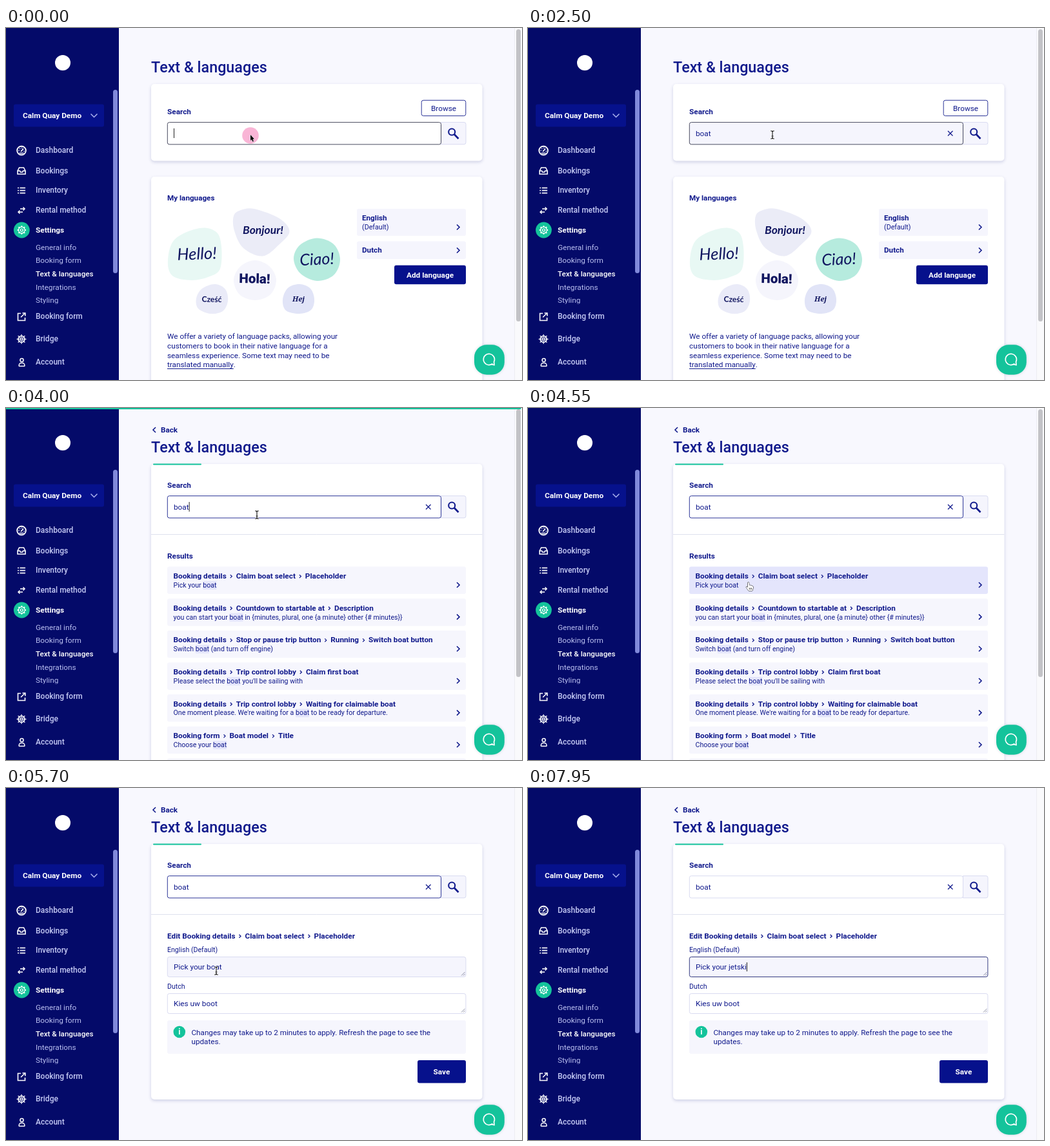
Animation of 800x547 px, one loop 8000 ms. Source, as an HTML page with a canvas:

```html
<!DOCTYPE html>
<html lang="en">
<head>
<meta charset="utf-8">
<title>Text &amp; languages</title>
<style>
html, body { margin: 0; width: 100%; height: 100%; overflow: hidden; background: #f8f8fe; }
canvas { display: block; width: 800px; height: 547px; }
</style>
</head>
<body>
<canvas id="stage"></canvas>
<script>
const W = 800, H = 547, LOOP = 8000;
const cv = document.getElementById('stage');
const dpr = window.devicePixelRatio || 1;
cv.width = W * dpr;
cv.height = H * dpr;
const c = cv.getContext('2d');

const NAVY = '#111a8c', DEEP = '#040a69', BTN = '#06118c', TEAL = '#14c39b';
const PALE = '#f5f5fd', LINE = '#d9dbf1', INK = '#10155f';
const SANS = 'Roboto, "Open Sans", sans-serif';

// Moments of the story, in ms
const SUBMIT = 2450, RESULTS = 3960, HOVER = 4500, OPEN = 4640, DETAIL = 5170, FOCUS = 6200, SELECT = 6380;
const SEARCH_KEYS = [450, 650, 850, 1050];
const EDIT_KEYS = [6850, 7100, 7400, 7600, 7750, 7900];

function text(s, x, y, size, color = NAVY, weight = 400, align = 'left', family = SANS) {
  c.font = `${weight} ${size}px ${family}`;
  c.fillStyle = color;
  c.textAlign = align;
  c.fillText(s, x, y + size * 0.32);
  return c.measureText(s).width;
}
function width(s, size, weight = 400) {
  c.font = `${weight} ${size}px ${SANS}`;
  return c.measureText(s).width;
}
function box(x, y, w, h, r, fill, stroke) {
  c.beginPath();
  c.roundRect(x, y, w, h, r);
  if (fill) { c.fillStyle = fill; c.fill(); }
  if (stroke) { c.strokeStyle = stroke; c.lineWidth = 1; c.stroke(); }
}
function disc(x, y, r, fill) {
  c.beginPath();
  c.arc(x, y, r, 0, 7);
  c.fillStyle = fill;
  c.fill();
}
function ring(x, y, r, color, lw) {
  c.beginPath();
  c.arc(x, y, r, 0, 7);
  c.strokeStyle = color;
  c.lineWidth = lw;
  c.stroke();
}
function line(pts, color, lw = 1.5) {
  c.beginPath();
  for (let i = 0; i < pts.length; i += 2) c.lineTo(pts[i], pts[i + 1]);
  c.strokeStyle = color;
  c.lineWidth = lw;
  c.stroke();
}
function card(y, h) {
  c.save();
  c.shadowColor = 'rgba(40,50,130,.2)';
  c.shadowBlur = 5 * dpr;
  c.shadowOffsetY = 2 * dpr;
  box(225, y, 513.5, h, 5, '#fff');
  c.restore();
}
// Smooth closed curve through the points
function blob(pts, fill) {
  const n = pts.length / 2;
  const at = (i, k) => pts[((i + n) % n) * 2 + k];
  const pull = (i, k, s) => at(i, k) + s * (at(i + 1, k) - at(i - 1, k)) / 6;
  c.beginPath();
  c.moveTo(pts[0], pts[1]);
  for (let i = 0; i < n; i++) {
    c.bezierCurveTo(pull(i, 0, 1), pull(i, 1, 1), pull(i + 1, 0, -1), pull(i + 1, 1, -1), at(i + 1, 0), at(i + 1, 1));
  }
  c.fillStyle = fill;
  c.fill();
}
function word(s, x, y, size, angle, style, family) {
  c.save();
  c.translate(x, y);
  c.rotate(angle);
  text(s, 0, 0, size, INK, style, 'center', family);
  c.restore();
}
const chevron = (x, y) => line([x - 2, y - 4, x + 2, y, x - 2, y + 4], NAVY, 1.6);
const blink = (t, from) => (t - from) % 1000 < 500;
const typed = (keys, t) => keys.filter(k => t >= k).length;

function gear(x, y) {
  ring(x, y, 4.9, '#fff', 1.2);
  ring(x, y, 2, '#fff', 1.2);
  for (let i = 0; i < 8; i++) {
    const a = i * Math.PI / 4, u = Math.cos(a), v = Math.sin(a);
    line([x + u * 5, y + v * 5, x + u * 6.7, y + v * 6.7], '#fff', 2);
  }
}

const icons = {
  dashboard(y) {
    ring(24, y, 6.8, '#fff', 1.9);
    line([23, y + 1.5, 27, y - 3], '#fff', 1.8);
    for (const [dx, dy] of [[-4, 0], [-2.5, -3], [0.5, -4], [4, 1]]) disc(24 + dx, y + dy, 0.8, '#fff');
    line([20.5, y + 4, 27.5, y + 4], '#fff', 1.5);
  },
  tray(y) {
    line([18, y, 20.5, y - 5, 27.5, y - 5, 30, y, 30, y + 5, 18, y + 5, 18, y, 21.5, y, 22.5, y + 2, 25.5, y + 2, 26.5, y, 30, y], '#fff', 1.6);
  },
  list(y) {
    for (const d of [-4, 0, 4]) {
      line([18, y + d, 20, y + d], '#fff', 1.7);
      line([21.5, y + d, 30, y + d], '#fff', 1.7);
    }
  },
  swap(y) {
    line([22, y - 2.5, 29, y - 2.5], '#fff');
    line([26.5, y - 5, 29, y - 2.5, 26.5, y], '#fff');
    line([26, y + 2.5, 19, y + 2.5], '#fff');
    line([21.5, y, 19, y + 2.5, 21.5, y + 5], '#fff');
  },
  link(y) {
    line([23, y - 5, 18.5, y - 5, 18.5, y + 6, 29.5, y + 6, 29.5, y + 1.5], '#fff', 1.6);
    line([23, y + 1, 29.5, y - 5.5], '#fff', 1.6);
    line([25.5, y - 5.5, 29.8, y - 5.5, 29.8, y - 1], '#fff', 1.6);
  },
  wheel(y) {
    ring(24, y, 5, '#fff', 1.6);
    ring(24, y, 1.5, '#fff', 1.2);
    for (let i = 0; i < 8; i++) {
      const a = i * Math.PI / 4, u = Math.cos(a), v = Math.sin(a);
      line([24 + u * 2, y + v * 2, 24 + u * 7.5, y + v * 7.5], '#fff', 1.2);
    }
  },
  person(y) {
    ring(24.5, y - 3.5, 2.6, '#fff', 1.5);
    c.beginPath();
    c.roundRect(20.2, y + 1, 8.6, 5, [3.5, 3.5, 0.5, 0.5]);
    c.stroke();
  }
};

const MENU = [
  ['Dashboard', 190.5, 'dashboard'], ['Bookings', 222, 'tray'], ['Inventory', 252.5, 'list'],
  ['Rental method', 283.5, 'swap'], ['Booking form', 448.5, 'link'], ['Bridge', 483.5, 'wheel'], ['Account', 519.5, 'person']
];
const SUBMENU = [['General info', 341], ['Booking form', 361], ['Text & languages', 382], ['Integrations', 403], ['Styling', 423.5]];

function sidebar() {
  c.fillStyle = DEEP;
  c.fillRect(0, 0, 175, H);
  disc(88, 54, 12, '#fff');
  box(12, 118.5, 140, 35, 3, BTN);
  text('Calm Quay Demo', 26, 136, 11.8, '#fff', 700);
  line([131.5, 133.5, 136.5, 138.5, 141.5, 133.5], '#a9b1ee', 1.5);
  box(166, 96, 7, 285, 3.5, '#8089da');
  for (const [name, y, icon] of MENU) {
    icons[icon](y);
    text(name, 46, y, 12, '#c6cbf5', 500);
  }
  disc(24.3, 314, 12.4, TEAL);
  gear(24.3, 314);
  text('Settings', 46, 314, 11.8, '#fff', 700);
  c.save();
  c.beginPath();
  c.rect(40, 330, 130, 98.5);
  c.clip();
  for (const [name, y] of SUBMENU) {
    const on = y === 382;
    text(name, 46, y, on ? 11.6 : 11.8, on ? '#fff' : '#b9bff0', on ? 500 : 400);
  }
  c.restore();
}

function searchField(y, s, o) {
  box(674.5, y + 0.5, 38.5, 34.3, [0, 3, 3, 0], PALE, LINE);
  box(250.3, y + 0.6, 424.2, 34.3, 3, o.fill || '#fff', o.border);
  const w = text(s, 260, y + 18, 11.8);
  if (o.caret) line([260.5 + w, y + 10, 260.5 + w, y + 25], '#222', 1);
  if (s) {
    line([651, y + 14, 658.5, y + 21.5], NAVY, 1.3);
    line([658.5, y + 14, 651, y + 21.5], NAVY, 1.3);
  }
  ring(691.2, y + 15.5, 5, NAVY, 2.1);
  line([695, y + 19.2, 701.5, y + 26], NAVY, 2.7);
}

function button(x, y, w, h, s) {
  box(x, y, w, h, 3, BTN);
  text(s, x + w / 2, y + h / 2 + 0.5, 11.8, '#fff', 700, 'center');
}

function languagesPage(t) {
  card(87, 119.5);
  text('Search', 250, 130, 11.8, NAVY, 700);
  box(644.2, 112.3, 68.6, 24.2, 3, '#fff', '#2c3598');
  text('Browse', 678.5, 125.3, 11.8, NAVY, 400, 'center');
  const n = typed(SEARCH_KEYS, t), busy = t >= SUBMIT;
  searchField(146, 'boat'.slice(0, n), {
    fill: busy && PALE,
    border: '#484a5e',
    caret: !busy && (t < 1050 || blink(t, 1050))
  });

  card(231, 340);
  text('My languages', 250, 264.5, 11.7, NAVY, 700);
  blob([300, 311, 326, 317, 334, 340, 332, 374, 316, 386, 288, 392, 258, 385, 251, 360, 262, 328], '#e8f8f4');
  blob([385, 281, 424, 296, 439.5, 316, 424, 336, 398, 354.5, 368, 342, 354, 315, 353, 292, 364, 283], '#ebecf7');
  blob([482, 326.5, 508, 336, 518, 360, 508, 384, 482, 393, 456, 381, 446, 358, 456, 337], '#b6ebde');
  blob([386, 361, 408, 370, 419, 391, 410, 414, 386, 423, 362, 414, 353, 391, 364, 370], '#f5f5fc');
  blob([324, 398, 340, 406, 344, 424, 336, 440, 317, 444, 298, 436, 295, 420, 304, 405], '#eaebf8');
  blob([455, 398, 472, 405, 478, 422, 473, 438, 455, 444, 434, 439, 429, 422, 437, 404], '#e1e4f7');
  word('Hello!', 296, 351.5, 25.5, -0.04, 'italic 400', 'Lato, sans-serif');
  word('Bonjour!', 398.5, 314, 17.5, 0, 'italic 700', 'Lato, sans-serif');
  word('Ciao!', 482, 360, 25, -0.05, 'italic 400', 'Lato, sans-serif');
  word('Hola!', 385.5, 390, 20.5, 0.02, '900', SANS);
  word('Cześć', 319, 422, 12, 0.02, '700', 'Lato, sans-serif');
  word('Hej', 453.5, 421.5, 11.2, 0, 'italic 700', '"Noto Serif", serif');

  const copy = ['We offer a variety of language packs, allowing your',
    'customers to book in their native language for a',
    'seamless experience. Some text may need to be'];
  copy.forEach((s, i) => text(s, 250, 479 + i * 14.9, 11.75));
  const w = text('translated manually', 250, 523.5, 11.75);
  line([250, 529.5, 250 + w, 529.5], NAVY, 1);
  text('.', 250 + w, 523.5, 11.75);

  box(544, 281, 169, 42, 3, PALE);
  box(544, 331.5, 169, 27.5, 3, PALE);
  text('English', 552, 295.5, 11.7, NAVY, 700);
  text('(Default)', 552, 309.3, 10.7);
  text('Dutch', 552, 345.5, 11.7, NAVY, 700);
  chevron(701, 309.5);
  chevron(701, 345.5);
  button(602, 368.7, 111, 29.6, 'Add language');
}

function crumbs(parts, x, y) {
  parts.forEach((s, i) => {
    if (i) {
      line([x + 6, y - 2.2, x + 8.5, y + 0.3, x + 6, y + 2.8], NAVY, 1.3);
      x += 15;
    }
    x += text(s, x, y, 11.8, NAVY, 700);
  });
}

const ROWS = [
  ['Booking details/Claim boat select/Placeholder', 'Pick your boat'],
  ['Booking details/Countdown to startable at/Description', 'you can start your boat in {minutes, plural, one {a minute} other {# minutes}}'],
  ['Booking details/Stop or pause trip button/Running/Switch boat button', 'Switch boat (and turn off engine)'],
  ['Booking details/Trip control lobby/Claim first boat', "Please select the boat you'll be sailing with"],
  ['Booking details/Trip control lobby/Waiting for claimable boat', "One moment please. We're waiting for a boat to be ready for departure."],
  ['Booking form/Boat model/Title', 'Choose your boat'],
  ['Booking form/Boat model/Description', 'Select the boat you want']
];

function innerHead(t) {
  line([232, 30, 228, 34, 232, 38], NAVY, 1.6);
  text('Back', 240, 34, 11.7, NAVY, 700);
  card(87, t < DETAIL ? 480 : 397);
  box(228, 86.5, 75, 2, 1, TEAL);
  text('Search', 250, 120, 11.8, NAVY, 700);
  const on = t < FOCUS;
  searchField(136, 'boat', { border: on ? '#2c3598' : LINE, caret: on && blink(t, 3950) });
  line([225, 196.5, 738.5, 196.5], '#dfe1ee', 1);
}

function resultsPage(t) {
  innerHead(t);
  text('Results', 250, 230, 11.8, NAVY, 700);
  ROWS.forEach(([path, s], i) => {
    const y = 246.5 + i * 49.65, cut = s.indexOf('boat');
    const hover = !i && t >= HOVER;
    box(250, y, 463, 42.5, 3, hover ? '#e4e5fc' : '#f6f6fd');
    crumbs(path.split('/'), 259.5, y + 14.8);
    box(259.5 + width(s.slice(0, cut), 10.6), y + 22.5, width('boat', 10.6), 13, 1, '#e4e5fb');
    text(s, 259.5, y + 29, 10.6);
    chevron(701, y + 28.5);
  });
}

function area(y, s, fill, border) {
  box(250.3, y + 0.5, 462.6, 31, 3, fill, border);
  line([706, y + 29.5, 711.5, y + 24], '#70748f', 0.8);
  line([709, y + 29.5, 711.5, y + 27], '#70748f', 0.8);
  return text(s, 260, y + 16.5, 11.8);
}

function detailPage(t) {
  innerHead(t);
  crumbs(['Edit Booking details', 'Claim boat select', 'Placeholder'], 250, 230);
  text('English (Default)', 250, 251.3, 10.6);
  const n = typed(EDIT_KEYS, t), on = t >= FOCUS;
  const s = 'Pick your ' + (n ? 'jetski'.slice(0, n) : 'boat');
  const w = area(262, s, PALE, on ? '#343b80' : LINE);
  if (t >= SELECT && !n) {
    const x = 260 + width('Pick your ', 11.8);
    box(x, 270, width('boat', 11.8), 16, 0, '#b4d5fe');
    text('boat', x, 278.5, 11.8);
  } else if (on) {
    line([260.5 + w, 271, 260.5 + w, 285], '#222', 1);
  }
  text('Dutch', 250, 308.3, 10.6);
  area(319, 'Kies uw boot', '#fff', LINE);
  box(250, 361, 463, 52, 3, '#f6f6fd');
  disc(268.8, 379, 9.3, TEAL);
  text('i', 268.8, 379.5, 12, '#fff', 700, 'center');
  text('Changes may take up to 2 minutes to apply. Refresh the page to see the', 287.5, 380, 11.7);
  text('updates.', 287.5, 394.5, 11.7);
  button(638, 423, 75, 35.5, 'Save');
}

// Loading bar: slows as it fills, then completes and fades out
function progress(t, start, end) {
  if (t < start || t > end + 400) return;
  let p = 0;
  for (let f = (Math.min(t, end) - start) / 16.667; f > 0; f--) {
    p += 0.05 * (1 - Math.sqrt(p)) ** 2 * Math.min(1, f);
  }
  if (t > end) {
    p = Math.min(1, p + (t - end) / 100);
    c.globalAlpha = Math.max(0, Math.min(1, 1 - (t - end - 60) / 300));
  }
  c.fillStyle = TEAL;
  c.fillRect(0, 0, W * p, 2);
  c.globalAlpha = 1;
}

function chat() {
  c.save();
  c.shadowColor = 'rgba(20,60,90,.18)';
  c.shadowBlur = 4 * dpr;
  box(726, 492.3, 46.8, 46.5, 19.5, TEAL);
  c.restore();
  c.beginPath();
  c.arc(748.8, 515, 8.6, 0.95, 0.45 + Math.PI * 2);
  c.lineTo(757, 523.8);
  c.lineTo(752.8, 522.6);
  c.closePath();
  c.lineJoin = 'round';
  c.strokeStyle = '#fff';
  c.lineWidth = 1.7;
  c.stroke();
  c.lineJoin = 'miter';
}

// time, x, y
const PATH = [[0, 379, 166], [2500, 379, 166], [2900, 389, 166], [4000, 389, 166], [4520, 342, 271],
  [5280, 342, 271], [5680, 326, 284], [5800, 326, 284], [6120, 323, 280]];

function mouseAt(t) {
  const i = PATH.findIndex(k => k[0] > t);
  if (i < 0) return PATH[PATH.length - 1].slice(1);
  const [t0, x0, y0] = PATH[i - 1], [t1, x1, y1] = PATH[i];
  const u = (t - t0) / (t1 - t0), e = u * u * (3 - 2 * u);
  return [x0 + (x1 - x0) * e, y0 + (y1 - y0) * e];
}

function shape(pts, fill, edge) {
  c.lineJoin = 'round';
  c.beginPath();
  for (let i = 0; i < pts.length; i += 2) c.lineTo(pts[i], pts[i + 1]);
  c.closePath();
  c.strokeStyle = edge;
  c.lineWidth = 1;
  c.stroke();
  c.fillStyle = fill;
  c.fill();
  c.lineJoin = 'miter';
}
const arrow = () => shape([0, 0, 0, 9, 1.9, 7.2, 3.5, 10.8, 5, 10.1, 3.5, 6.7, 6, 6.5], '#000', '#fff');
function beam() {
  for (const [color, lw] of [['#fff', 2.6], ['#111', 1.1]]) {
    line([-2.8, -6, -1, -6, 0, -5, 1, -6, 2.8, -6], color, lw);
    line([0, -5, 0, 5], color, lw);
    line([-2.8, 6, -1, 6, 0, 5, 1, 6, 2.8, 6], color, lw);
    line([-1.5, 2, 1.5, 2], color, lw * 0.8);
  }
}
function hand() {
  shape([-1.2, 0, 0.6, 0, 1, 4.5, 3, 4.3, 3.4, 5.2, 5, 5, 5.6, 6, 7, 6.2, 7, 9.5, 5.8, 13, 0, 13, -2.5, 9.5, -4, 7, -3, 6.3, -1.2, 8], '#fff', '#111');
  for (const x of [1.2, 3, 4.8]) line([x, 8.5, x, 11.2], '#111', 0.7);
}

const CLICKS = [[-100, 379, 167], [OPEN, 342, 272], [FOCUS, 323, 280], [SELECT, 323, 280]];

function mouse(t) {
  for (const [at, x, y] of CLICKS) {
    const a = Math.min(1, 1 - (t - at - 120) / 150);
    if (t < at || a <= 0) continue;
    c.globalAlpha = a;
    disc(x, y, 12.8, 'rgba(246,150,196,.7)');
    c.globalAlpha = 1;
  }
  const hidden = t >= SEARCH_KEYS[0] && t < 2500 || t >= EDIT_KEYS[0];
  if (hidden) return;
  const [x, y] = mouseAt(t);
  c.save();
  c.translate(x, y);
  if (t < 300 || t > 4080 && t < 4400) arrow();
  else if (t >= 4400 && t < DETAIL) hand();
  else beam();
  c.restore();
}

function status(t) {
  if (t < 4650 || t >= 5400) return;
  box(-1, 531, 266.5, 17, [0, 3, 0, 0], '#dedfe3', '#b9bac2');
  text('...letsbook.app/.../CustomerArea.BookingDetails.ClaimBo...', 4, 539.5, 10, '#3d3f46');
}

function draw(t) {
  c.setTransform(dpr, 0, 0, dpr, 0, 0);
  c.fillStyle = '#f8f8fe';
  c.fillRect(0, 0, W, H);
  text('Text & languages', 225, 61.5, 23.3, NAVY, 500);
  if (t < RESULTS) languagesPage(t);
  else if (t < DETAIL) resultsPage(t);
  else detailPage(t);
  sidebar();
  c.fillStyle = '#fafafc';
  c.fillRect(789, 0, 11, H);
  line([788.5, 0, 788.5, H], '#ececf2', 1);
  if (t < DETAIL) box(791, 2, 7, t < RESULTS ? 454 : 416, 3.5, '#c3c3c7');
  chat();
  progress(t, 2765, RESULTS);
  progress(t, 5107, 5215);
  status(t);
  mouse(t);
}

const t0 = performance.now();
function frame() {
  draw((performance.now() - t0) % LOOP);
  requestAnimationFrame(frame);
}
frame();
</script>
</body>
</html>
```
